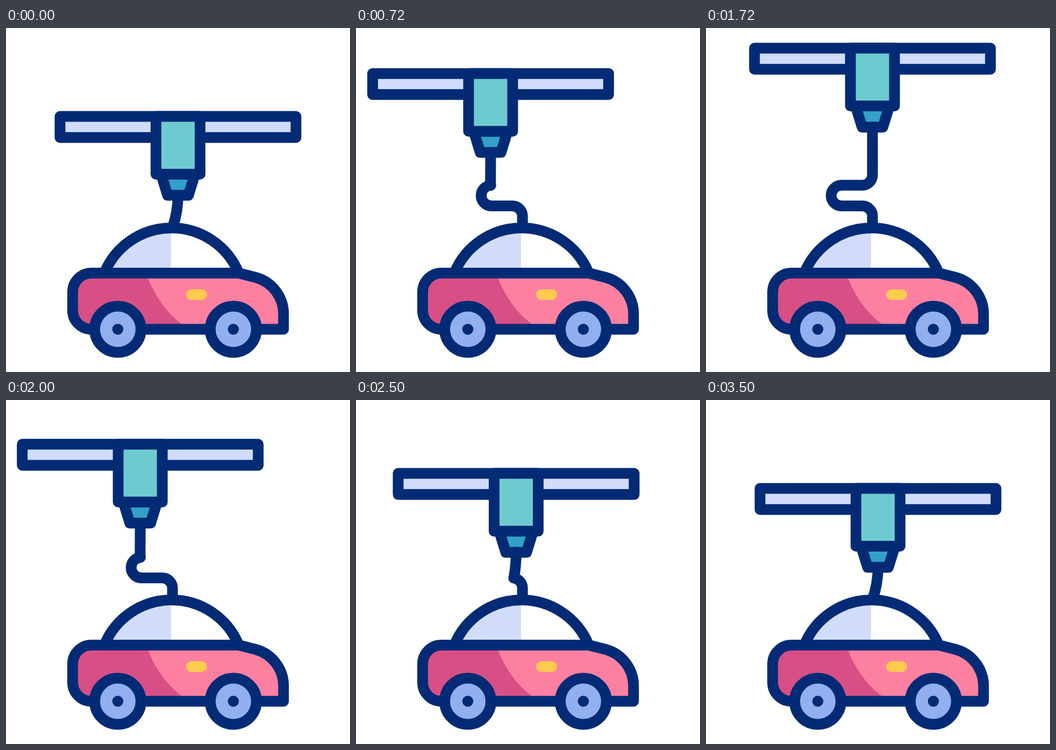
Animation of 640x640 px, one loop 3.6 s. Source, as an HTML page:

```html
<!DOCTYPE html>
<html lang="en">
<head>
<meta charset="utf-8">
<title>Car printer</title>
<style>
  html, body { margin: 0; width: 100%; height: 100%; overflow: hidden; background: #fff; }
  svg { display: block; width: 100vw; height: 100vh; }
  .line { stroke: #032b75; stroke-width: 20; stroke-linejoin: round; stroke-linecap: round; }
</style>
</head>
<body>
<svg viewBox="0 0 640 640">
  <path id="cable" class="line" fill="none"
    d="M309.7 372V350A19 19 0 0 0 290.7 331H252A19.2 19.2 0 0 1 252 292.6H290.7A19 19 0 0 0 309.7 273.6V230"/>

  <g id="printer">
    <rect class="line" x="100.5" y="164.5" width="439" height="39.2" fill="#d1dcfa"/>
    <path class="line" d="M288.5 272L300.7 311.3H339.3L351.5 272Z" fill="#32a0c9"/>
    <rect class="line" x="279" y="164.5" width="82" height="107.5" fill="#6dcbd0"/>
  </g>
  <path id="thread" class="line" fill="none"/>

  <path d="M183 456A135 135 0 0 1 433 456Z" fill="#fff"/>
  <path d="M183 456A135 135 0 0 1 307 372V456Z" fill="#d1dcfa"/>
  <path class="line" d="M183 456A135 135 0 0 1 433 456Z" fill="none"/>

  <path id="body" fill="#fd80a1"
    d="M159 456H433L464.5 464A70.5 70.5 0 0 1 516.3 532V560.5H159A35 35 0 0 1 124 525.5V491A35 35 0 0 1 159 456Z"/>
  <path fill="#d84f86"
    d="M159 456H261C272 490 295 527 326 550L340 560.5H159A35 35 0 0 1 124 525.5V491A35 35 0 0 1 159 456Z"/>
  <use href="#body" class="line" style="fill-opacity:0"/>
  <rect x="335" y="486" width="39" height="20" rx="10" fill="#fecb4f"/>

  <g id="wheel">
    <circle class="line" cx="208" cy="560.5" r="43" fill="#92b0f0"/>
    <circle cx="208" cy="560.5" r="10.3" fill="#032b75"/>
  </g>
  <use href="#wheel" x="215"/>
</svg>
<script>
const LOOP = 3600, STEP = 20;
const LIFT = 131, CABLE = 251;
const RISE = { from: 20, to: 1020, liftPace: 0.83, cablePace: 0.8 };
const FALL = { from: 2780, to: 1700, liftPace: 0.82, cablePace: 0.75 };

const byId = id => document.getElementById(id);
const cable = byId('cable'), printer = byId('printer'), thread = byId('thread');

const clamp = v => Math.max(0, Math.min(1, v));
// Nearly linear, with a rush at the end; pace 1 is fully linear
const ease = (s, pace) => pace * s + (1 - pace) * s ** 5;

function draw(ms) {
  const t = Math.floor(ms % LOOP / STEP) * STEP;
  const move = t < FALL.to ? RISE : FALL;
  const s = clamp((t - move.from) / (move.to - move.from));
  const lift = LIFT * ease(s, move.liftPace);
  const done = ease(s, move.cablePace);
  const laid = CABLE * done;

  // The nozzle follows the end of the laid cable, starting a little to its right
  const end = cable.getPointAtLength(laid);
  const x = end.x + 10.3 * (1 - done) ** 4;
  const tip = 311 - lift;

  printer.setAttribute('transform', `translate(${x - 320} ${-lift})`);
  cable.setAttribute('stroke-dasharray', `${laid} 999`);
  thread.setAttribute('d', `M${x} ${tip}Q${x} ${(tip + end.y) / 2} ${end.x} ${end.y}`);
}

const start = performance.now();
function tick() {
  draw(performance.now() - start);
  requestAnimationFrame(tick);
}
tick();
</script>
</body>
</html>
```
